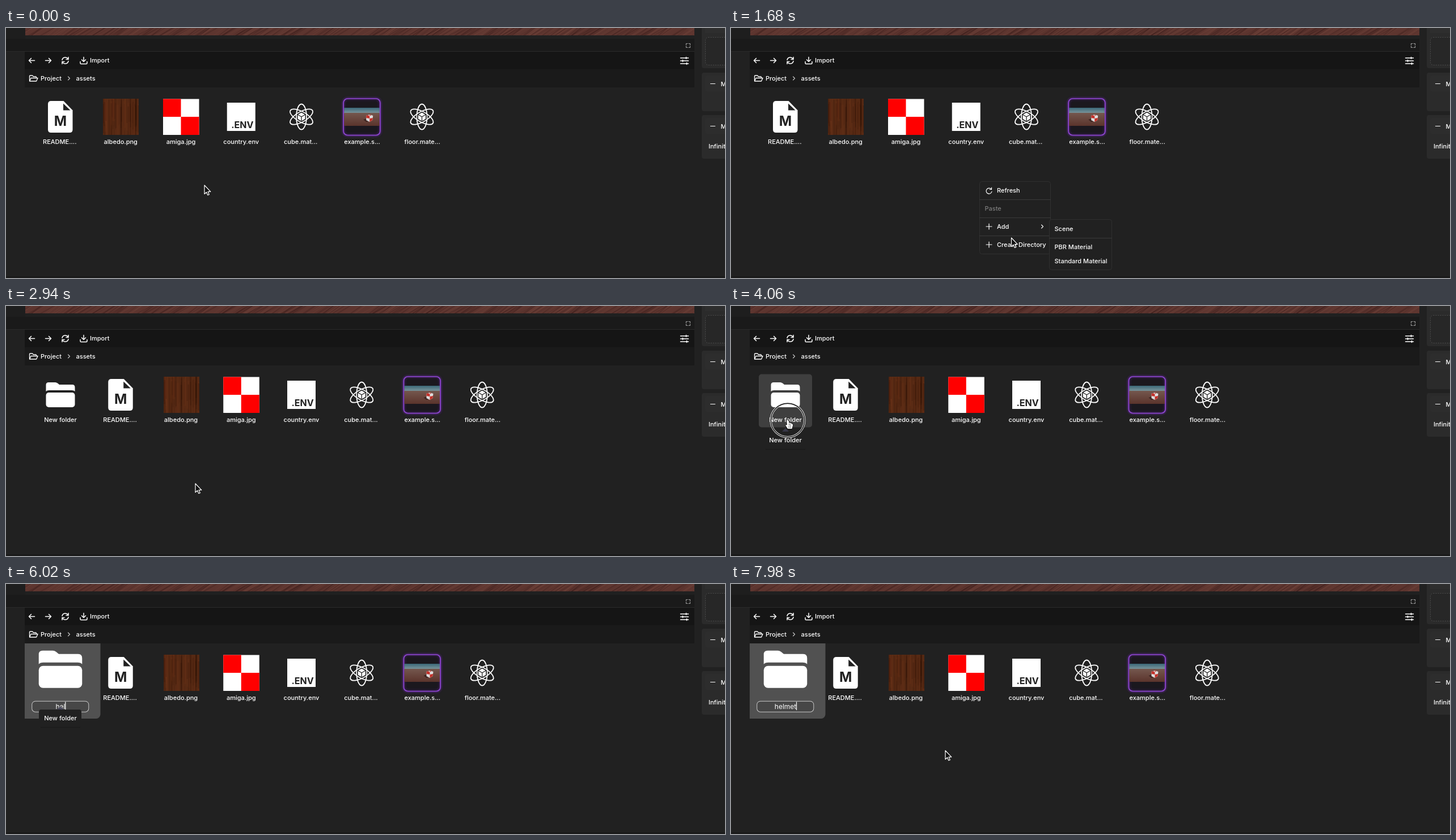
Recreate the animation shown at these times as an HTML page with a canvas. Size 1268 px wide and 442 px high, loop 8 s.

```html
<!DOCTYPE html>
<html lang="en">
<head>
<meta charset="utf-8">
<title>Asset browser</title>
<style>
  html, body { margin: 0; width: 100%; height: 100%; overflow: hidden; background: #212121; }
  canvas { display: block; width: 100vw; height: 100vh; }
</style>
</head>
<body>
<canvas id="stage" width="1268" height="442"></canvas>
<script>
const LOOP = 8000, STEP = 70;
const ctx = document.getElementById('stage').getContext('2d');

// ---------- helpers ----------
const clamp = v => Math.max(0, Math.min(1, v));
const ramp = (t, from, to) => clamp((t - from) / (to - from));
const easeOut = v => 1 - (1 - v) ** 3;

function seeded(seed) {
  return () => (seed = (seed * 16807) % 2147483647) / 2147483647;
}

function rect(x, y, w, h, fill) {
  ctx.fillStyle = fill;
  ctx.fillRect(x, y, w, h);
}

function roundRect(x, y, w, h, r, fill, stroke, width = 1) {
  ctx.beginPath();
  ctx.roundRect(x, y, w, h, r);
  if (fill) { ctx.fillStyle = fill; ctx.fill(); }
  if (stroke) { ctx.strokeStyle = stroke; ctx.lineWidth = width; ctx.stroke(); }
}

function text(str, x, y, { size = 11, weight = 500, color = '#fff', align = 'left' } = {}) {
  ctx.font = `${weight} ${size}px Inter, sans-serif`;
  ctx.fillStyle = color;
  ctx.textAlign = align;
  ctx.fillText(str, x, y);
}

function stroke(d, x = 0, y = 0, color = '#fff', width = 1.5) {
  at(x, y, () => {
    ctx.strokeStyle = color;
    ctx.lineWidth = width;
    ctx.lineCap = ctx.lineJoin = 'round';
    ctx.stroke(new Path2D(d));
  });
}

function fill(d, color) {
  ctx.fillStyle = color;
  ctx.fill(new Path2D(d));
}

function at(x, y, draw, scale = 1) {
  ctx.save();
  ctx.translate(x, y);
  ctx.scale(scale, scale);
  draw();
  ctx.restore();
}

function texture(w, h, draw) {
  const canvas = document.createElement('canvas');
  canvas.width = w;
  canvas.height = h;
  draw(canvas.getContext('2d'));
  return canvas;
}

// ---------- wood ----------
const floorStrip = texture(1180, 13, c => {
  const random = seeded(71);
  c.fillStyle = '#5d352f';
  c.fillRect(0, 0, 1180, 13);
  for (let i = 0; i < 420; i++) {
    const x = random() * 1240 - 30, slant = 18 + random() * 10;
    c.strokeStyle = random() < .55 ? 'rgba(48,22,20,.24)' : 'rgba(132,84,72,.17)';
    c.lineWidth = .6 + random() * 1.6;
    c.beginPath();
    c.moveTo(x, 14);
    c.lineTo(x + slant, -1);
    c.stroke();
  }
});

const plank = texture(63, 64, c => {
  const random = seeded(19);
  c.fillStyle = '#572a14';
  c.fillRect(0, 0, 63, 64);
  for (let i = 0; i < 90; i++) {
    c.fillStyle = random() < .5 ? 'rgba(34,12,4,.2)' : 'rgba(128,66,34,.16)';
    c.fillRect(random() * 63, random() * 30 - 15, .6 + random() * 1.8, 40 + random() * 40);
  }
});

// ---------- file thumbnails, drawn around their own centre ----------
function docIcon() {
  fill('M-16.500-28H5.500L21.500-11.500V22.500Q21.500 28 16 28H-16.500Q-22 28-22 22.500V-22.500Q-22-28-16.500-28Z', '#fff');
  fill('M5-23.500V-11.500H17.500Z', '#212121');
  text('M', 0, 16, { size: 24, weight: 700, color: '#212121', align: 'center' });
}

function woodIcon() { ctx.drawImage(plank, -31, -32); }

function checkerIcon() {
  rect(-31.5, -31.5, 63.5, 63.5, '#fff');
  rect(-31.5, -31.5, 31.5, 31.5, '#f00');
  rect(0, 0, 32, 32, '#f00');
}

function envIcon() {
  rect(-25, -25, 50, 50, '#fff');
  text('.ENV', 2, 20, { size: 16, weight: 700, color: '#212121', align: 'center' });
}

function atomIcon() {
  ctx.strokeStyle = '#fff';
  ctx.lineWidth = 1.8;
  for (const turn of [0, 1, 2]) {
    ctx.beginPath();
    ctx.ellipse(0, 0, 9, 22.5, turn * Math.PI / 3, 0, Math.PI * 2);
    ctx.stroke();
  }
  const cube = 'M0-7.500L6.500-3.800V3.800L0 7.500L-6.500 3.800V-3.800Z';
  stroke(cube, 0, 0, '#212121', 3);
  fill(cube, '#fff');
  stroke('M-6-3.500L0 0L6-3.500M0 0V7', 0, 0, '#212121', 1.3);
}

function sceneIcon() {
  ctx.save();
  ctx.shadowColor = '#6a2aa8';
  ctx.shadowBlur = 4;
  roundRect(-32, -32, 64.5, 64.5, 7, '#1b181e', '#9148d4', 1.7);
  ctx.restore();
  const sky = ctx.createLinearGradient(0, -16, 0, -7);
  sky.addColorStop(0, '#3c6878');
  sky.addColorStop(1, '#78939a');
  rect(-31, -16, 62.5, 10, sky);
  const ground = ctx.createLinearGradient(0, -7, 0, 16);
  ground.addColorStop(0, '#74574e');
  ground.addColorStop(1, '#5b342c');
  rect(-31, -7, 62.5, 23, ground);
  fill('M3 5L11 2L16 7L8 9Z', '#3d2420');
  fill('M8-2L14-4L20-2L19 6L14 9L8 6Z', '#ddd');
  fill('M8-2L11-3L14-1L14 3L8 2ZM14 3L19.500 2L19 6L14 9ZM14-4L17-3L14-1.500Z', '#c3312a');
}

function folderIcon() {
  fill('M-25.500-6V-17.500Q-25.500-22-21-22H-9Q-7-22-5-20.500L-2-18H21Q25.500-18 25.500-13V-6Q24-8 20-8H-20Q-24-8-25.500-6Z', '#fff');
  roundRect(-25.5, -4, 51, 26, 5, '#fff');
}

const FILES = [
  ['README....', docIcon, true], ['albedo.png', woodIcon], ['amiga.jpg', checkerIcon],
  ['country.env', envIcon], ['cube.mat...', atomIcon, true],
  ['example.s...', sceneIcon, true], ['floor.mate...', atomIcon, true]
];

function drawFiles(t) {
  const shift = t >= 2590 ? 1 : 0;
  FILES.forEach(([label, icon, cut], i) => {
    const x = 96 + 106.25 * (i + shift);
    at(x, 157, icon);
    text(label, cut ? x - 31 : x, 205, { align: cut ? 'left' : 'center' });
  });
}

// ---------- the new folder ----------
const TYPING = [[5250, 'h'], [5530, 'he'], [6020, 'hel'], [6230, 'helm'], [6440, 'helme'], [6650, 'helmet']];

function drawFolder(t) {
  if (t < 2590) return;
  const editing = t >= 4270, grow = easeOut(ramp(t, 4200, 4690));
  ctx.save();
  ctx.beginPath();
  ctx.rect(33, 105, 1181, 335);
  ctx.clip();
  at(96, 167.5, () => {
    const shade = 63 + 18 * grow;
    if (t >= 3360) roundRect(-47, -47, 94, 94, 5, `rgb(${shade},${shade},${shade})`);
    at(0, -10.5 - grow * .7, folderIcon);
    if (editing) drawInput(t);
    else text('New folder', 0, 37.5, { align: 'center' });
  }, 1 + grow / 2);
  ctx.restore();
}

function drawInput(t) {
  roundRect(-33.5, 26.5, 66.7, 12.6, 4, '#474747', '#c8c8c8', .67);
  const typed = TYPING.filter(([time]) => t >= time).pop();
  const value = typed ? typed[1] : 'New folder';
  const style = { size: 8, weight: 400, align: 'center' };
  ctx.font = `400 ${style.size}px Inter, sans-serif`;
  const half = ctx.measureText(value).width / 2;
  if (!typed) rect(-half, 27.3, half * 2, 10.4, '#4f6a8c');
  text(value, 0, 35.7, style);
  const caretOff = t >= 7210 && t < 7700;
  if (typed && !caretOff) rect(half - .2, 27.2, .8, 9.8, '#fff');
}

function drawTooltip(t) {
  const alpha = ramp(t, 3570, 3850) * (1 - ramp(t, 7490, 7630));
  if (!alpha) return;
  ctx.globalAlpha = alpha;
  rect(61, 253, 70, 1, '#191919');
  roundRect(58, 222, 75, 31, 4, '#212121');
  fill('M90 222L96 216L102 222Z', 'rgba(62,62,84,.8)');
  text('New folder', 96, 241, { align: 'center' });
  ctx.globalAlpha = 1;
}

// ---------- context menus ----------
const PLUS = 'M-5 0H5M0-5V5', CHEVRON = 'M-1.500-3L1.500 0L-1.500 3';

function panel(x, y, w, h, lines) {
  roundRect(x + .5, y + .5, w - 1, h - 1, 4, '#212121', '#303030');
  for (const line of lines) rect(x, line, w, 1, '#3a3a3a');
}

function drawMenus(t) {
  const shown = easeOut(ramp(t, 770, 980)) * (1 - ramp(t, 2450, 2590));
  if (shown) {
    ctx.globalAlpha = shown;
    at(437, 319, () => {
      ctx.translate(-437, -319);
      panel(438, 271, 126, 129, [303, 335, 367]);
      stroke('M4-3A5 5 0 1 0 5 1M4.500-6V-2.500H1', 455, 288, '#fff', 1.2);
      text('Refresh', 469, 291);
      text('Paste', 447.5, 323, { color: '#7c7c7c' });
      stroke(PLUS, 455, 351, '#fff', 1.2);
      text('Add', 469, 355);
      stroke(CHEVRON, 549, 351, '#fff', 1.1);
      stroke(PLUS, 455, 383, '#fff', 1.2);
      text('Create Directory', 469, 387);
    }, .92 + .08 * shown);
  }
  const sub = ramp(t, 1330, 1540) * (1 - ramp(t, 1750, 1890));
  if (sub) {
    ctx.globalAlpha = sub;
    panel(561, 338, 111, 90, [371]);
    text('Scene', 570.5, 359);
    text('PBR Material', 570.5, 391);
    text('Standard Material', 570.5, 416);
  }
  ctx.globalAlpha = 1;
}

// ---------- pointer ----------
const PATH = [
  [140, 350, 278], [350, 395, 276], [560, 436, 270], [1050, 436, 270], [1260, 466, 318],
  [1470, 494, 354], [1680, 494.5, 371], [1890, 494, 380], [2520, 494, 380], [2730, 424, 352],
  [2940, 334, 314], [3290, 144, 238], [3500, 100, 202], [7490, 100, 202], [7630, 230, 288],
  [7770, 392, 369], [7840, 406, 352], [7910, 394, 318], [7980, 378, 294.5]
];

function pointerAt(t) {
  const i = PATH.findIndex(key => key[0] > t);
  if (i === 0) return PATH[0].slice(1);
  if (i < 0) return PATH[PATH.length - 1].slice(1);
  const [t0, x0, y0] = PATH[i - 1], [t1, x1, y1] = PATH[i], k = ramp(t, t0, t1);
  return [x0 + (x1 - x0) * k, y0 + (y1 - y0) * k];
}

const ARROW = 'M0 0V15.500L3.500 12.200L5.800 17.500L8.300 16.400L6 11.300H10.800Z';
const HAND = 'M-2 0Q0-2 1.500 1L2.500 5Q4 3.500 5 5.500Q6.500 4.500 7.500 6.500Q9.500 6.500 9 9.500L7.500 15H0L-3.500 9.500Q-4.500 7-1 8.500Z';

function ring(x, y, r, outer, inner) {
  ctx.beginPath();
  ctx.arc(x, y, r, 0, Math.PI * 2);
  ctx.strokeStyle = outer;
  ctx.lineWidth = 3.4;
  ctx.stroke();
  ctx.strokeStyle = inner;
  ctx.lineWidth = 1.5;
  ctx.stroke();
}

function drawPointer(t) {
  if (t >= 770 && t < 980) {
    ctx.globalAlpha = t < 910 ? 1 : .4;
    ctx.beginPath();
    ctx.arc(436, 271, 21, 0, Math.PI * 2);
    ctx.fillStyle = '#212121';
    ctx.fill();
    ring(436, 271, 21, '#4fae54', '#8fdc90');
    ctx.globalAlpha = 1;
  }
  if (t >= 2240 && t < 2520) ring(494, 380, 22, '#e8e8e8', '#111');
  if ((t >= 4060 && t < 4130) || (t >= 4270 && t < 4340)) ring(100, 202, 29.8, '#e8e8e8', '#111');
  if (t >= 5250 && t < 7560) return;
  const hand = t >= 3360 && t < 5250;
  at(...pointerAt(t), () => {
    if (hand) {
      stroke(HAND, 0, 0, '#111', 1.6);
      fill(HAND, '#fff');
      stroke('M2.500 6V9M5 7V9.500M2 11V13M4.500 11V13', 0, 0, '#333', .8);
    } else {
      fill(ARROW, '#111');
      stroke(ARROW, 0, 0, '#fff', 1.2);
    }
  });
}

// ---------- surrounding interface ----------
function drawChrome() {
  rect(0, 0, 1268, 442, '#212121');
  rect(0, 0, 34, 19, '#1e1e1e');
  rect(34, 13, 1180, 6, '#202020');
  ctx.drawImage(floorStrip, 34, 0);
  rect(0, 19, 1214, 22, '#1a1a1a');
  rect(0, 41, 1214, 1, '#2b2b2b');
  rect(33, 42, 1181, 31, '#151515');
  rect(33, 73, 1181, 32, '#1a1a1a');
  rect(0, 439, 1268, 3, '#1a1a1a');

  stroke('M5 0H-5M-1-4L-5 0L-1 4', 45.5, 57.5);
  stroke('M-5 0H5M1-4L5 0L1 4', 74.5, 57.5);
  stroke('M-5.500-1A5.600 5.600 0 0 1 5-2.500M5.500-6V-2H1.500M5.500 1A5.600 5.600 0 0 1-5 2.500M-5.500 6V2H-1.500', 104.5, 57.5);
  stroke('M0-6V2M-3.500-1.500L0 2L3.500-1.500M-6 2V4.500Q-6 6-4.500 6H4.500Q6 6 6 4.500V2', 137, 57.5);
  text('Import', 148, 61.3);
  stroke('M-7-5H7M-7 0H7M-7 5H7M3-6.500V-3.500M-3-1.500V1.500M4 3.500V6.500', 1196.5, 58);
  stroke('M-3.500-1V-3.500H-1M1-3.500H3.500V-1M3.500 1V3.500H1M-1 3.500H-3.500V1', 1203, 31, '#999', 1.2);

  stroke('M-7 5V-4Q-7-5-6-5H-2L0-3H4Q5-3 5-2V-.500M-7 5L-4.500-.500H7.500L5 5Z', 48.5, 89, '#fff', 1.3);
  text('Project', 61, 93);
  stroke(CHEVRON, 111, 89, '#ccc', 1.1);
  text('assets', 123.5, 93);

  const card = '#2b2b2b';
  roundRect(1227, -6, 60, 77, 4, card);
  rect(1233, 0, 35, 9, '#2e2e2e');
  ctx.setLineDash([2, 2]);
  roundRect(1233.5, 16.5, 50, 49, 5, '#272727', '#4c4c4c');
  ctx.setLineDash([]);
  for (const [y, h] of [[79, 68], [154, 77]]) {
    roundRect(1227, y, 60, h, 4, card);
    roundRect(1233, y + 5, 50, 28, 4, '#2d2d2d');
    stroke('M-4 0H4', 1246.5, y + 19.5, '#fff', 1.2);
    text('Mesh', 1260.5, y + 23.5);
  }
  text('Infinity', 1239, 213);
}

function render(now) {
  const t = Math.floor((now % LOOP) / STEP) * STEP;
  drawChrome();
  drawFiles(t);
  drawFolder(t);
  drawTooltip(t);
  drawMenus(t);
  drawPointer(t);
}

const start = performance.now();
(function tick() {
  render(performance.now() - start);
  requestAnimationFrame(tick);
})();
</script>
</body>
</html>
```
